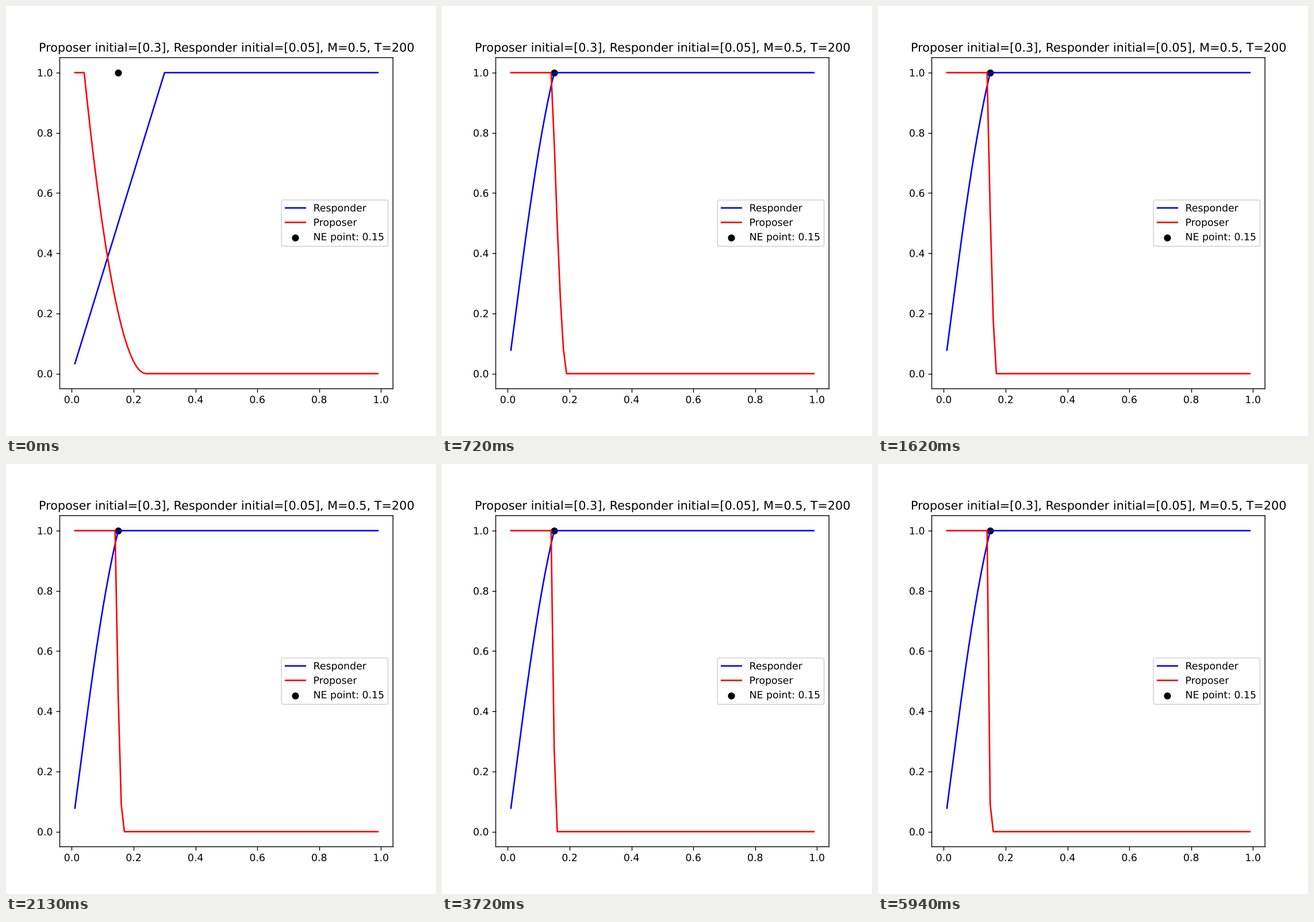
Animation of 748 by 748 pixels, one loop 5.97 s. Source, as a matplotlib script:

```python
import numpy as np
import matplotlib.pyplot as plt
from matplotlib.animation import FuncAnimation
from matplotlib.patheffects import Normal

FRAMES, INTERVAL = 199, 30
RATE = 0.5
GRID = np.arange(1, 100) / 100


def pure(value):
    """Strategy with all its mass on one grid value."""
    s = np.zeros(len(GRID))
    s[round(value * 100) - 1] = 1
    return s


def project(v):
    """Euclidean projection onto the probability simplex."""
    u = np.sort(v)[::-1]
    shift = (np.cumsum(u) - 1) / np.arange(1, len(v) + 1)
    last = np.nonzero(u > shift)[0][-1]
    return np.maximum(v - shift[last], 0)


def play(rounds):
    """Follow the regularized leader in the ultimatum game."""
    offer, threshold = pure(0.3), pure(0.05)
    gain_p = np.zeros(len(GRID))
    gain_r = np.zeros(len(GRID))
    accept, above = [], []
    for _ in range(rounds):
        gain_p += (1 - GRID) * np.cumsum(threshold)
        gain_r += np.cumsum((GRID * offer)[::-1])[::-1]
        offer, threshold = project(RATE * gain_p), project(RATE * gain_r)
        accept.append(np.cumsum(threshold))
        above.append(1 - np.cumsum(offer))
    return accept, above


accept, above = play(FRAMES)

# Outline text and unsnapped strokes keep subpixel positions.
plt.rcParams.update({
    "font.family": "DejaVu Sans",
    "text.hinting": "none",
    "path.snap": False,
    "path.effects": [Normal()],
})
fig, ax = plt.subplots(figsize=(6, 6), dpi=748 / 6)
fig.subplots_adjust(left=0.125, right=0.9, bottom=0.11, top=0.88)
responder, = ax.plot(GRID, accept[0], color="blue", label="Responder")
proposer, = ax.plot(GRID, above[0], color="red", label="Proposer")
ax.scatter([0.15], [1], color="black", label="NE point: 0.15")
ax.set_xlim(-0.039, 1.039)
ax.set_ylim(-0.05, 1.05)
ax.set_title("Proposer initial=[0.3], Responder initial=[0.05], M=0.5, T=200")
ax.legend(loc="center right")


def update(i):
    responder.set_ydata(accept[i])
    proposer.set_ydata(above[i])
    return responder, proposer


anim = FuncAnimation(fig, update, frames=FRAMES, interval=INTERVAL,
                     repeat=True, repeat_delay=0)
plt.show()
```
